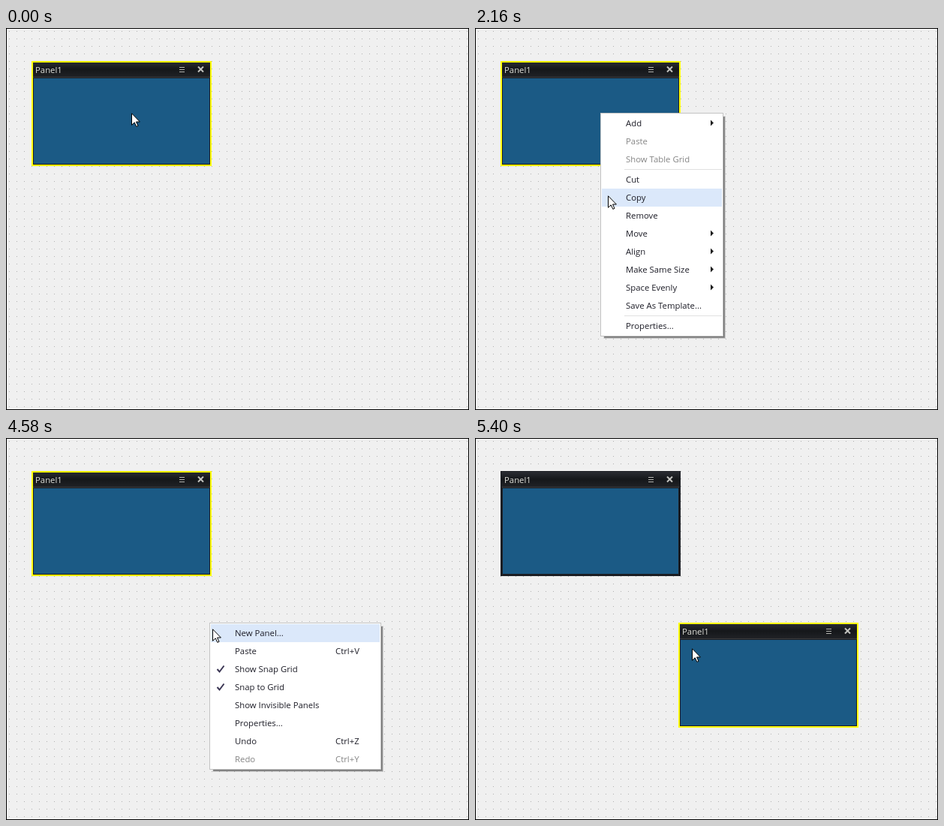
Recreate the animation shown at these times as an HTML page with a canvas. Size 617 by 509 pixels, loop 6.46 s.

```html
<!DOCTYPE html>
<html>
<head>
<meta charset="utf-8">
<style>
html, body { margin: 0; height: 100%; overflow: hidden; background: #f0f0f0; }
canvas { display: block; }
</style>
</head>
<body>
<canvas id="stage" width="617" height="509"></canvas>
<script>
const ctx = document.getElementById('stage').getContext('2d', { alpha: false });
const LOOP = 6460, STEP = 69, ROW = 24;

const panelMenu = {
  x: 167, y: 113, w: 164, indent: 34,
  items: ['Add>', '!Paste', '!Show Table Grid', '-', 'Cut', 'Copy', 'Remove', 'Move>', 'Align>',
    'Make Same Size>', 'Space Evenly>', 'Save As Template...', '-', 'Properties...']
};
const stageMenu = {
  x: 271, y: 246, w: 229, indent: 34,
  items: ['New Panel...', 'Paste|Ctrl+V', '*Show Snap Grid', '*Snap to Grid', 'Show Invisible Panels',
    'Properties...', 'Undo|Ctrl+Z', '!Redo|Ctrl+Y']
};

const easeIn = u => u ** 1.4;
const easeOut = u => Math.sin(u * Math.PI / 2);
const easeBoth = u => (1 - Math.cos(u * Math.PI)) / 2;
const moves = [
  { start: 1120, steps: 10, to: [161, 186], ease: easeIn },
  { start: 1810, steps: 6, to: [177, 223], ease: easeOut },
  { start: 3080, steps: 8, to: [271, 246], ease: easeBoth },
  { start: 4580, steps: 7, to: [289, 280], ease: easeOut }
];

// The pointer advances in discrete steps.
function pointerAt(t) {
  let pos = [167, 113];
  for (const { start, steps, to, ease } of moves) {
    if (t < start) break;
    const u = ease(Math.min(1, (Math.floor((t - start) / STEP) + 1) / steps));
    pos = pos.map((p, i) => Math.round(p + (to[i] - p) * u));
  }
  return pos;
}

function rect(x, y, w, h, color) {
  ctx.fillStyle = color;
  ctx.fillRect(x, y, w, h);
}

function line(points, color, width) {
  ctx.beginPath();
  points.forEach(([x, y]) => ctx.lineTo(x, y));
  ctx.strokeStyle = color;
  ctx.lineWidth = width;
  ctx.stroke();
}

function text(str, x, y, color) {
  ctx.font = '11.35px "Open Sans", "Noto Sans", sans-serif';
  ctx.fillStyle = color;
  ctx.fillText(str, x, y);
}

function drawGrid(x0, y0, x1, y1) {
  for (let y = y0; y <= y1; y += 10)
    for (let x = x0; x <= x1; x += 10) rect(x, y, 1, 1, '#b0b0b0');
}

function drawPanel(x, y, selected) {
  ctx.save();
  ctx.translate(x, y);
  rect(0, 0, 240, 140, '#1b1d22');
  const bar = ctx.createLinearGradient(0, 0, 0, 22);
  bar.addColorStop(0, '#2c2e35');
  bar.addColorStop(0.5, '#15171a');
  bar.addColorStop(1, '#212327');
  rect(1, 1, 238, 21, bar);
  rect(2, 21, 236, 1, '#3b3c3e');
  rect(3, 23, 234, 114, '#1b5a85');
  text('Panel1', 5, 16, '#e2e2dc');
  for (let i = 0; i < 3; i++) rect(197, 8 + 3 * i, 7, 1, '#b4b4b0');
  line([[222, 7.5], [229, 14.5]], '#c4c4c0', 2);
  line([[229, 7.5], [222, 14.5]], '#c4c4c0', 2);
  if (selected) {
    ctx.strokeStyle = '#ff0';
    ctx.lineWidth = 2;
    ctx.strokeRect(1, 1, 238, 138);
  }
  ctx.restore();
}

function drawMenu({ x, y, w, indent, items }, [px, py]) {
  const h = items.reduce((sum, item) => sum + (item === '-' ? 3 : ROW), 4);
  for (let i = 1; i <= 3; i++) rect(x + 8 - i, y + 8 - i, w - 8 + 2 * i, h - 8 + 2 * i - 0, `rgba(0,0,0,0)`);
  for (const [grow, alpha] of [[3, 0.16], [2, 0.28], [1, 0.2]])
    rect(x + 6 - grow / 2, y + 6 - grow / 2, w - 6 + grow * 1.5, h - 6 + grow * 1.5, `rgba(0,0,0,${alpha})`);
  rect(x, y, w, h, '#c3c3c3');
  rect(x + 1, y + 1, w - 2, h - 2, '#fff');
  let top = y + 2;
  for (const item of items) {
    if (item === '-') {
      rect(x + 32, top + 1, w - 34, 1, '#e0e0e0');
      top += 3;
      continue;
    }
    if (px >= x + 2 && py >= top && py < top + ROW) rect(x + 2, top, w - 4, ROW, '#dbe8fa');
    const color = item[0] === '!' ? '#858585' : '#1e1e28';
    const [label, shortcut] = item.replace(/[!*>]/g, '').split('|');
    text(label, x + indent, top + 16, color);
    if (shortcut) text(shortcut, x + 168, top + 16, color);
    if (item[0] === '*')
      line([[x + 10.5, top + 12], [x + 13.5, top + 15.5], [x + 19.5, top + 7.5]], '#3b3654', 2);
    if (item.endsWith('>')) {
      ctx.beginPath();
      ctx.moveTo(x + 147, top + 7.5);
      ctx.lineTo(x + 151, top + 11.5);
      ctx.lineTo(x + 147, top + 15.5);
      ctx.fillStyle = '#1e1e1e';
      ctx.fill();
    }
    top += ROW;
  }
}

const arrow = new Path2D('M.5 .8V16.3L4.2 12.8L6.8 18.4L9 17.4L6.5 12H11.4Z');

function drawPointer([x, y], alpha) {
  ctx.save();
  ctx.translate(x, y);
  ctx.globalAlpha = alpha;
  ctx.fillStyle = '#fff';
  ctx.fill(arrow);
  ctx.strokeStyle = '#000';
  ctx.lineWidth = 1;
  ctx.stroke(arrow);
  ctx.restore();
}

function drawClick([x, y]) {
  ctx.beginPath();
  ctx.arc(x, y, 12, 0, 2 * Math.PI);
  ctx.fillStyle = 'rgba(255,10,10,.5)';
  ctx.fill();
}

function draw(t) {
  const within = (from, to) => t >= from && t < to;
  const pointer = pointerAt(t);
  const repainting = within(5330, 5400), pasted = t >= 5400;

  rect(0, 0, 617, 509, '#000');
  rect(1, 1, 615, 507, '#f0f0f0');
  if (repainting) drawGrid(274, 254, 504, 384);
  else drawGrid(4, 4, 614, 504);
  drawPanel(34, 44, !pasted);
  if (pasted) drawPanel(271, 246, true);
  if (within(660, 2820)) drawMenu(panelMenu, pointer);
  if (within(4100, 5330)) drawMenu(stageMenu, pointer);
  drawPointer(pointer, repainting ? 0.45 : 1);
  if (within(530, 660) || within(2690, 2820) || within(3900, 4100) || within(5200, 5330)) drawClick(pointer);
}

function tick() {
  draw(performance.now() % LOOP);
  requestAnimationFrame(tick);
}
tick();
</script>
</body>
</html>
```
